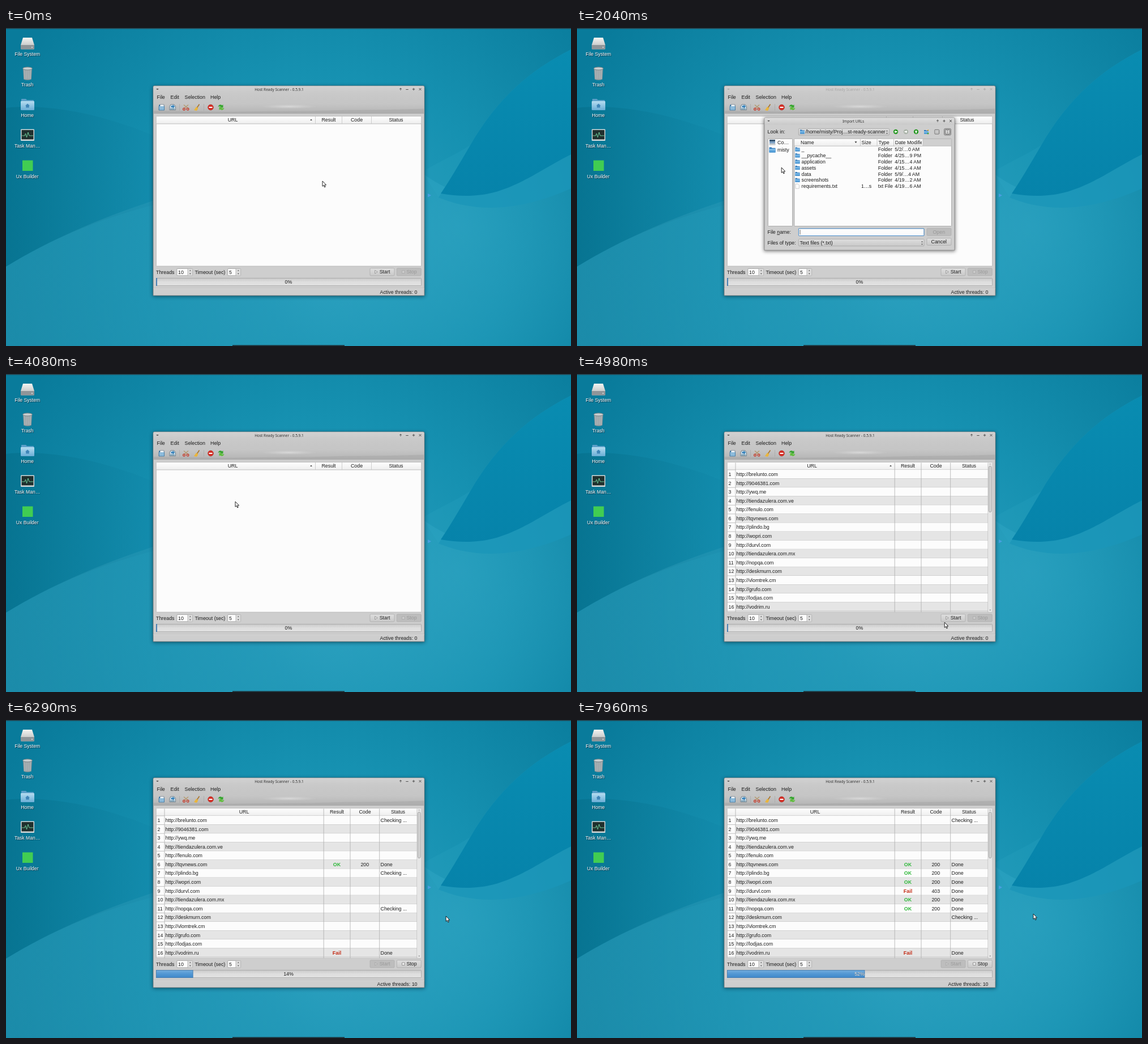
Recreate the animation shown at these times as an HTML page. Size 998 px wide and 561 px high, loop 8000 ms.

```html
<!DOCTYPE html>
<html lang="en">
<head>
<meta charset="utf-8">
<title>Desktop demo</title>
<style>
  html, body { margin: 0; width: 100%; height: 100%; overflow: hidden; background: #1590b1; }
  svg { display: block; width: 998px; height: 561px; }
  text { font: 8.87px "Liberation Sans", Arial, sans-serif; fill: #1c1c1c; white-space: pre; }
  .desk { font-size: 8.6px; fill: #fff; }
  .shade { font-size: 8.6px; fill: #012; opacity: .75; }
  .title text { font: 500 6.5px "Noto Sans", "Open Sans", sans-serif; fill: #333; }
  .title path { fill: none; stroke: #444; stroke-width: .9; }
  .title.dim text { fill: #a6a6a6; }
  .title.dim path { stroke: #a9a9a9; }
  .btn rect { fill: url(#face); stroke: #a6a6a6; stroke-width: .7; }
  .btn.off rect { fill: #bdbdbd; stroke: #adadad; }
  .btn.hot rect { fill: #e4e4e4; }
  .btn.down rect { fill: #b2b2b2; stroke: #888; }
  .btn.off text { fill: #999; }
  .btn path { fill: #eee; stroke: #777; stroke-width: .7; }
  .btn.off path { stroke: #a4a4a4; fill: #ccc; }
  .file > .back { fill: none; }
  .file.sel > .back { fill: #4a90d0; }
  .file.sel text { fill: #fff; }
  .ok { fill: #2fb83a; font-weight: bold; }
  .fail { fill: #c32a14; font-weight: bold; }
</style>
</head>
<body>
<svg id="stage" viewBox="0 0 998 561" xmlns="http://www.w3.org/2000/svg"></svg>
<script>
const LOOP = 8000;
const stage = document.getElementById('stage');
const $ = id => document.getElementById(id);
const range = n => Array.from({ length: n }, (_, i) => i);

// Markup helpers; text y is the middle of the capitals.
const text = (x, y, s, more = '') => `<text x="${x}" y="${y + 3.1}" ${more}>${s}</text>`;
const mid = (x, y, s, more = '') => text(x, y, s, `text-anchor="middle" ${more}`);
const rect = (x, y, w, h, fill, more = '') =>
  `<rect x="${x}" y="${y}" width="${w}" height="${h}" fill="${fill}" ${more}/>`;
const path = (d, fill = 'none', more = '') => `<path d="${d}" fill="${fill}" ${more}/>`;
const line = (d, stroke, width = .8) => path(d, 'none', `stroke="${stroke}" stroke-width="${width}"`);
const circle = (x, y, r, fill, more = '') => `<circle cx="${x}" cy="${y}" r="${r}" fill="${fill}" ${more}/>`;
const group = (id, body, more = '') => `<g id="${id}" ${more}>${body}</g>`;
const at = (x, y, body) => `<g transform="translate(${x} ${y})">${body}</g>`;
const box = (x, y, w, h, fill = '#fcfcfc', edge = '#9c9c9c', r = 1) =>
  rect(x + .4, y + .4, w - .8, h - .8, fill, `stroke="${edge}" stroke-width=".8" rx="${r}"`);
const fade = (id, stops, dir = 'x2="0" y2="1"') => `<linearGradient id="${id}" ${dir}>` +
  stops.map(([o, c, a = 1]) => `<stop offset="${o}" stop-color="${c}" stop-opacity="${a}"/>`).join('') + '</linearGradient>';
const up = (x, y, s = 1.8, fill = '#333') => path(`M${x - s} ${y + s * .6}h${2 * s}l${-s} ${-s * 1.3}z`, fill);
const down = (x, y, s = 1.8, fill = '#333') => path(`M${x - s} ${y - s * .6}h${2 * s}l${-s} ${s * 1.3}z`, fill);
const button = (id, x, y, w, h, label, labelX, icon = '') =>
  group(id, rect(x, y, w, h, 'none', 'rx="1.5"') + icon + mid(labelX, y + h / 2, label), 'class="btn"');

const defs = `<defs>
  <radialGradient id="sky" gradientUnits="userSpaceOnUse" cx="560" cy="400" r="640">
    <stop offset="0" stop-color="#2aa0bf"/><stop offset=".5" stop-color="#1691b1"/>
    <stop offset="1" stop-color="#097b9b"/></radialGradient>
  <radialGradient id="shine" gradientUnits="userSpaceOnUse" cx="800" cy="350" r="350">
    <stop offset="0" stop-color="#36a9c6" stop-opacity=".5"/><stop offset="1" stop-color="#36a9c6" stop-opacity="0"/></radialGradient>` +
  fade('left', [[0, '#06728f'], [1, '#138cad']], 'x2="1" y2="0"') +
  fade('hill', [[0, '#2b97b3', .5], [.5, '#2b9ab8', .4], [1, '#2b9ab8', 0]], 'x2="1" y2="0"') +
  fade('fin', [[0, '#098cb1'], [1, '#0683aa']]) +
  fade('bar', [[0, '#d2d2d2'], [.25, '#c9c9c9'], [.65, '#c5c5c5'], [1, '#b4b4b4']]) +
  fade('face', [[0, '#dedede'], [1, '#c9c9c9']]) +
  fade('head', [[0, '#fdfdfd'], [1, '#eeeeee']]) +
  fade('fill', [[0, '#72acdd'], [.5, '#5297d3'], [1, '#4088c9']]) +
  fade('trough', [[0, '#c9c9c9'], [.5, '#dedede'], [1, '#e2e2e2']]) +
  fade('folder', [[0, '#8ec6ee'], [1, '#3d8fd0']]) +
  fade('home', [[0, '#b5dcf0'], [1, '#6aaed6']]) +
  fade('steel', [[0, '#f4f4f2'], [1, '#b4b7b8']]) +
  `<radialGradient id="glow"><stop offset="0" stop-color="#d9d9d9"/>
    <stop offset="1" stop-color="#d0d0d0" stop-opacity="0"/></radialGradient>
  <filter id="blur" x="-10%" y="-10%" width="120%" height="120%"><feGaussianBlur stdDeviation="3"/></filter>
  <clipPath id="done"><rect id="doneBox" x="265" y="440" height="16"/></clipPath>
  <clipPath id="dateClip"><rect x="559" y="195" width="50" height="155"/></clipPath></defs>`;

function wallpaper() {
  return rect(0, 0, 998, 561, 'url(#sky)') +
    path('M0 141C70 133 170 150 270 194V310C170 334 80 372 0 421z', 'url(#left)', 'opacity=".85"') +
    path('M0 421C80 372 170 334 262 304C400 264 520 270 660 330V561H0z', 'url(#hill)') +
    path('M400 180C560 150 680 215 735 256C775 285 810 297 842 294C900 286 950 246 998 223V561H400z', 'url(#shine)') +
    path('M735 254C790 220 850 205 870 146L764 299C755 285 745 270 735 254z', '#2da3c1', 'opacity=".2"') +
    path('M998 38C925 75 868 124 820 207C800 241 783 271 764 299C820 322 895 329 998 283z', '#1b96b9', 'opacity=".8"') +
    path('M998 38C925 75 868 124 820 207C803 236 788 262 768 292C795 297 820 297 842 294C900 286 950 246 998 223z', 'url(#fin)') +
    path('M745 292l6 3.3l-6 3.3z', '#4a9fe0') +
    rect(0, 0, 998, 1.5, '#27404a') + rect(400, 559.4, 198, 1.6, '#1d3038');
}

function desktopIcons() {
  const label = (y, s) => mid(38.4, y + .8, s, 'class="shade"') + mid(37.7, y, s, 'class="desk"');
  return path('M30 17h16l4 13v6a1.5 1.5 0 0 1-1.5 1.5h-21a1.5 1.5 0 0 1-1.5-1.5v-6z', 'url(#steel)') +
    path('M26 30h24v6a1.5 1.5 0 0 1-1.5 1.5h-21a1.5 1.5 0 0 1-1.5-1.5z', '#8f9599') + circle(46, 34, 1, '#dfe6e8') +
    path('M30 71.5h16l-1.2 19q-6.800 3-13.600 0z', '#8f999d') +
    range(5).map(i => line(`M${32.6 + i * 2.7} 74l${.5 - i * .25} 16`, '#c4c9cb', 1)).join('') +
    `<ellipse cx="38" cy="71.5" rx="8.3" ry="2.5" fill="#c9ced0" stroke="#7d8587"/>` +
    path('M27 126q0-1 1-1h7l2 2h11q1 0 1 1v5H27z', '#5b9fc8') +
    rect(26, 129, 24, 16, 'url(#home)', 'rx="1.2"') + path('M34 137l4-3.6l4 3.6h-1.2v3.5h-5.600v-3.5z', '#3f86b8') +
    rect(26, 178.5, 24, 20.5, '#d4d9da', 'rx="1"') + rect(27.5, 180, 21, 16.5, '#20302e') +
    line('M28 190h5l1.5-4l2 7l2.5-9l2 6h7', '#74dca6', .9) +
    rect(29, 233.5, 18.5, 18.5, '#41cd52') +
    ['File System', 'Trash', 'Home', 'Task Man…', 'Ux Builder'].map((s, i) => label(46 + 54 * i, s)).join('');
}

const docIcon = (x, y) => at(x, y, path('M-5-3.5l1-1.5h3l1 1.5h4.5v8h-9.5z', '#3478ae') +
  rect(-3, -5, 7, 6, '#eef4f8', 'stroke="#456" stroke-width=".5"') + path('M-5-2h10l-.5 7h-9z', '#8dbbdb') +
  line('M-5-2v7h9.500v-7', '#2d6796', .7));

function toolbar() {
  return group('hover', rect(267, 132, 17, 16.5, '#a7a7a7', 'stroke="#707070" rx="1.5"')) + docIcon(275, 140) +
    at(294, 140, path('M-5-1.5l2-3.5h6l2.5 3.5v6h-10.5z', '#d9e5ec', 'stroke="#465b69" stroke-width=".7"') +
      path('M-4 1h8v3h-8z', '#8fb0c4') + path('M-2.5-3h3v-2l4 3.5l-4 3.5v-2h-3z', '#3d86bd')) +
    line('M306.5 134v12M349.5 134v12', '#aaa') +
    at(318, 140, line('M-4-4.5l8 7M4-4.5l-8 7', '#b59b72', 1.5) +
      circle(-3.5, 3, 1.9, 'none', 'stroke="#c7392b" stroke-width="1.3"') +
      circle(3, 3, 1.9, 'none', 'stroke="#c7392b" stroke-width="1.3"')) +
    at(337.5, 140, line('M4-5.5l-4 6', '#a9752e', 1.6) + path('M-1.5-1l3.5 2.5l-2.5 4.5l-5-1z', '#eab53c')) +
    circle(361.5, 140, 4.9, '#d42f26', 'stroke="#a82019" stroke-width=".5"') + rect(358.5, 139, 6, 2, '#fff') +
    at(380, 140, path('M-5.5-1q2-6 7.500-2.500l1.500-1.500v5.500h-5.500l1.500-1.500q-2.500-1.500-5 0z', '#35a52f') +
      path('M5.500 1q-2 6-7.500 2.500l-1.500 1.500v-5.500h5.500l-1.500 1.500q2.500 1.500 5 0z', '#5fbe3c'));
}

const windowMarks = (x, y, step, marks) => marks.map((d, i) => at(x + i * step, y, path(d))).join('');
const ARROW = 'M-1.8-.2l1.8-1.8l1.8 1.8M0-2v4';
const CROSS = 'M-2-2l4 4M2-2l-4 4';
const PLUS = 'M-2.2 0h4.4M0-2.2v4.4';

const heads = (y, list) => list.map(([x, s]) => mid(x, y, s)).join('');
const ROW = 15.58, TOP = 169;
const sites = ['brelunto.com', '9046381.com', 'ywq.me', 'tiendazulera.com.ve', 'fenulo.com', 'tqvnews.com',
  'plindo.bg', 'wopri.com', 'durvl.com', 'tiendazulera.com.mx', 'nopqa.com', 'deskmurn.com', 'vlomtrek.cm',
  'grufo.com', 'lodjas.com', 'vodrim.ru'];

function table() {
  const empty = heads(162, [[400.5, 'URL'], [570, 'Result'], [619.5, 'Code'], [689, 'Status']]) +
    up(539, 162) + line('M546.5 156v13M593.5 156v13M645.5 156v13', '#c4c4c4');
  const rows = sites.map((s, i) => {
    const y = TOP + ROW * i, c = y + 7.9;
    return rect(280, y, 446, ROW, i % 2 ? '#e5e5e5' : '#fcfcfc') + line(`M265.5 ${y + ROW}H726`, '#b2b2b2') +
      text(267.5, c, i + 1) + text(281.5, c, 'http://' + s) +
      mid(584.5, c, '', `id="res${i + 1}"`) + mid(633.8, c, '', `id="code${i + 1}"`) +
      text(661.5, c, '', `id="stat${i + 1}"`);
  }).join('');
  const full = heads(162, [[584.5, 'Result'], [634, 'Code'], [692.5, 'Status']]) + mid(0, 162, 'URL', 'id="urlHead"') +
    group('sort', up(554, 162)) + rows +
    line('M280 156.5V420M561.2 156.5V420M608 156.5V420M659.7 156.5V420M726 156.5V420', '#adadad') +
    rect(726.4, 156.3, 7, 263.3, '#e6e6e6') + box(727, 162, 5.5, 82, '#d3d3d3', '#999', 2.5) +
    up(729.8, 158.8, 1.3, '#999') + down(729.8, 416.5, 1.3, '#777');
  return box(265, 155.5, 469, 265, '#fcfcfc', '#b4b4b4') + rect(265.8, 156.3, 467.4, 12.7, 'url(#head)') +
    line('M265.5 169h468', '#adadad') + group('empty', empty) + group('full', full);
}

const spin = (x, w, s) => box(x, 424, w, 13.2) + text(x + 2.6, 430.5, s) +
  rect(x + w - 9, 424.8, 8.2, 11.6, '#dcdcdc') + line(`M${x + w - 9} 424.5v12.5`, '#aaa') +
  up(x + w - 4.7, 427.8, 1.3) + down(x + w - 4.7, 433.6, 1.3);

function mainWindow() {
  return rect(259, 103, 481, 371, '#002b3a', 'filter="url(#blur)" opacity=".6" rx="3"') +
    path('M260 472V104q0-2 2-2h475q2 0 2 2v368z', '#cecece', 'stroke="#777" stroke-width=".8"') +
    path('M260.4 151V104q0-1.6 2-1.6h474q2 0 2 1.6v47z', 'url(#bar)') +
    path('M260.5 146l60 .8l70 1l70-1l80-.5l60-1.5l80-.8l58-1.5v7.5h-478z', '#a9a9a9', 'opacity=".6"') +
    `<ellipse cx="500" cy="138.5" rx="50" ry="4" fill="url(#glow)"/>` +
    line('M260.5 150.6h478', '#a4a4a4') +
    group('mainTitle', mid(482.5, 107.7, 'Host Ready Scanner - 0.5.9.1') +
      at(267.5, 108, path('M-1.5-.5h3l-1.5 1.5z')) + windowMarks(697, 108, 11.5, [ARROW, 'M-2.2 .5h4.4', PLUS, CROSS])) +
    text(266.5, 122, 'File') + text(290.5, 122, 'Edit') + text(315.5, 122, 'Selection') + text(361, 122, 'Help') +
    toolbar() + table() +
    text(265, 430.5, 'Threads') + spin(301.5, 28.5, '10') + text(333.5, 430.5, 'Timeout (sec)') + spin(391.3, 23.7, '5') +
    button('start', 643, 423.7, 43, 13.3, 'Start', 669, path('M651.7 427.6l4.5 2.7l-4.5 2.7z')) +
    button('stop', 690.3, 423.7, 43, 13.3, 'Stop', 716.5, path('M699.5 428h4.6v4.6h-4.6z')) +
    box(265, 441, 469, 14, 'url(#trough)', '#a2a2a2') +
    `<rect id="fillBar" x="265.4" y="441.4" height="13.2" fill="url(#fill)" stroke="#3c77ad" stroke-width=".8"/>` +
    mid(499, 447.7, '', 'id="pct"') + `<g clip-path="url(#done)">` + mid(499, 447.7, '', 'id="pctLit" style="fill:#fff"') + '</g>' +
    line('M260.5 459h478', '#b5b5b5') + line('M260.5 459.9h478', '#dcdcdc') +
    text(726.5, 465.7, '', 'id="threads" text-anchor="end"');
}

const folder = (x, y) => path(`M${x} ${y - 3.5}h3l1 1h4v6h-8z`, '#2d76b8') + rect(x, y - 1.5, 8, 5, 'url(#folder)');
const sheet = (x, y) => path(`M${x + .6} ${y - 4}h4.2l2 2v6h-6.2z`, '#fff', 'stroke="#aaa" stroke-width=".6"');
const disc = (x, fill, turn) => circle(x, 183, 4.2, fill) +
  `<path transform="translate(${x} 183) rotate(${turn})" d="M-2.5 0l2.5-2.4v1.5h2.4v1.8h-2.4v1.5z" fill="#fff"/>`;

const fileRow = ([name, size, type, date], i) => {
  const y = 214 + 10.85 * i;
  return `<g class="file" id="${name}">` + rect(384, y - 5.4, 227, 10.8, 'none', 'class="back"') +
    (type === 'Folder' ? folder(385.5, y) : sheet(385.5, y)) + text(396.5, y, name) +
    (size.includes('K') ? text(528, y, size, 'text-anchor="end"') : text(502, y, size)) +
    text(531.8, y, type) + text(561.3, y, date) + '</g>';
};

function dialog() {
  const home = [['_', '5/2/…0 AM'], ['__pycache__', '4/25…9 PM'], ['application', '4/15…4 AM'], ['assets', '4/15…4 AM'],
    ['data', '5/9/…4 AM'], ['screenshots', '4/19…2 AM']].map(([n, d]) => [n, '', 'Folder', d]);
  home.push(['requirements.txt', '1…s', 'txt File', '4/19…6 AM']);
  const data = [['sites.txt', '12 KB', '4/19…5 AM'], ['sites2.txt', '9…s', '4/24…8 AM'], ['sites3.txt', '2…s', '4/25…3 AM'],
    ['test.txt', '9…s', '5/9/…1 AM']].map(([n, s, d]) => [n, s, 'txt File', d]);
  return rect(330, 159, 338, 235, '#000', 'filter="url(#blur)" opacity=".5"') +
    path('M331 392V160q0-2 2-2h332q2 0 2 2v232z', '#cecece', 'stroke="#808080" stroke-width=".8"') +
    rect(331.5, 158.5, 335, 12, 'url(#face)') +
    `<g class="title">` + mid(488, 163.7, 'Import URLs') + at(338.5, 164, path('M-1.5-.5h3l-1.5 1.5z')) +
    windowMarks(637, 164, 11.5, [ARROW, PLUS, CROSS]) + '</g>' +
    text(336.5, 183, 'Look in:') + box(391, 177, 161, 12.5, 'url(#face)', '#a6a6a6') + folder(394, 183) +
    text(403.5, 183, '', 'id="dir"') + up(547.5, 181.5, 1.3) + down(547.5, 186, 1.3) +
    disc(563, '#2c9a28', 0) + disc(581, '#a9b3a8', 180) + disc(599, '#2c9a28', 90) +
    folder(613, 183.5) + path('M618 180.5l3-1.5v3z', '#e0a12c') + circle(620, 186, 1.5, '#49a83a') +
    box(631.5, 179, 8.5, 8.5, '#f4f4f4', '#444') +
    line('M633.5 181.8h1.8M636.5 181.8h1.8M633.5 184.8h1.8M636.5 184.8h1.8', '#444', 1.3) +
    box(648, 177, 13, 12.5, '#aeaeae', '#777', 2) + box(650.3, 179, 8.5, 8.5, '#f4f4f4', '#444') +
    line('M652.5 181.8h4M652.5 184.8h4', '#444', 1) +
    box(337, 195, 44, 155) + rect(340, 197, 10, 6.5, '#35536f') + rect(340, 200, 10, 3.5, '#7ea2c5') +
    rect(339.5, 204.5, 11, 2, '#b9bfc4') + text(354, 201.5, 'Co…') +
    path('M339.5 210.5h4l1 1.2h6v7.8h-11z', '#2d76b8') + rect(339.5, 213, 11, 6.5, 'url(#folder)') + text(354, 215, 'misty') +
    box(383.5, 195, 278.5, 155) + rect(384.3, 195.8, 277, 12.3, '#d0d0d0') + rect(384.3, 195.8, 226.7, 12.3, 'url(#head)') +
    line('M384 208.2h277.5', '#b2b2b2') + line('M500.5 196v12M530 196v12M559.5 196v12M611 196v12', '#bbb') +
    text(395, 201.5, 'Name') + down(492.5, 201.5, 2) + text(502.5, 201.5, 'Size') + text(532.5, 201.5, 'Type') +
    `<g clip-path="url(#dateClip)">` + text(561.8, 201.5, 'Date Modified') + '</g>' +
    group('homeDir', home.map(fileRow).join('')) + group('dataDir', data.map(fileRow).join('')) +
    text(336.5, 360, 'File <tspan text-decoration="underline">n</tspan>ame:') +
    box(391, 353.3, 222.5, 13.7) +
    `<rect id="focus" x="391.5" y="353.8" width="221.5" height="12.7" rx="1" fill="none" stroke="#4a8fce"/>` +
    group('caret', line('M394 356v8.5', '#222', .7)) + text(393.5, 360, '', 'id="fileName"') +
    button('open', 618, 353.3, 43, 13, 'Open', 639.3) +
    text(336.5, 378.5, 'Files of type:') + box(391, 372, 222.5, 13, 'url(#face)', '#a6a6a6') + text(393.5, 378.5, 'Text files (*.txt)') +
    up(609.5, 377, 1.3) + down(609.5, 381.5, 1.3) +
    button('cancel', 618, 370.8, 43, 12.5, 'Cancel', 639.3);
}

const pointer = path('M0 0v9.3l2.2-1.9l1.5 3.5l1.5-.7l-1.5-3.3h2.9z', '#fff',
  'stroke="#111" stroke-width=".9" stroke-linejoin="round"');

stage.innerHTML = defs + wallpaper() + desktopIcons() + mainWindow() + group('dialog', dialog()) + group('cursor', pointer);

// time, x, y
const trail = [[0, 559, 270], [590, 559, 270], [700, 530, 260], [850, 440, 215], [1000, 340, 165], [1120, 275, 140],
  [1200, 254, 134], [1270, 258, 135], [1350, 270, 135], [1780, 270, 135], [1900, 310, 185], [2040, 361, 246],
  [2200, 392, 261], [2460, 403, 255], [2900, 403, 255], [3420, 404, 225], [3620, 405, 225], [4400, 405, 225],
  [4500, 430, 252], [4700, 540, 350], [4860, 620, 420], [4980, 649, 438], [5070, 669, 440], [5190, 662, 431],
  [5400, 662, 431], [5650, 690, 400], [5850, 735, 365], [6030, 766, 350], [6290, 777, 346], [6500, 806, 342], [LOOP, 806, 342]];

// Each finished check adds two percent.
const ticks = [5700, 5850, 5950, 6030, 6090, 6190, 6250, 6400, 6480, 6560, 6640, 6720, 6800, 6840, 6880,
  7030, 7090, 7150, 7210, 7270, 7310, 7340, 7610, 7640, 7670, 7830];

// time, row, result, code; no result means still checking
const log = [[5400, 1], [5400, 6], [5400, 11], [5400, 16], [6090, 6, 'OK', 200], [6090, 7], [6190, 16, 'Fail', ''],
  [6400, 7, 'OK', 200], [6400, 8], [6720, 8, 'OK', 200], [6720, 9], [7090, 9, 'Fail', 403], [7090, 10],
  [7270, 11, 'OK', 200], [7270, 12], [7830, 10, 'OK', 200]];

const show = (id, on) => $(id).setAttribute('visibility', on ? 'visible' : 'hidden');
const put = (id, s) => { const e = $(id); if (e.textContent !== String(s)) e.textContent = s; };
const cls = (id, s) => $(id).setAttribute('class', s);

function cursorAt(t) {
  const i = Math.max(1, trail.findIndex(p => p[0] >= t));
  const [t0, x0, y0] = trail[i - 1], [t1, x1, y1] = trail[i];
  const k = (t - t0) / (t1 - t0);
  return [x0 + (x1 - x0) * k, y0 + (y1 - y0) * k];
}

function drawResults(t) {
  const state = {};
  for (const [when, row, result = '', code = ''] of log) if (t >= when) state[row] = { result, code };
  sites.forEach((_, i) => {
    const n = i + 1, s = state[n];
    put('res' + n, s ? s.result : '');
    cls('res' + n, s ? s.result.toLowerCase() : '');
    put('code' + n, s ? s.code : '');
    put('stat' + n, s ? (s.result ? 'Done' : 'Checking ...') : '');
  });
}

function drawDialog(t) {
  const open = t >= 1750 && t < 3960, inside = t >= 2830;
  $('dialog').style.display = open ? '' : 'none';
  cls('mainTitle', t >= 1750 && t < 4020 ? 'title dim' : 'title');
  if (!open) return;
  $('homeDir').style.display = inside ? 'none' : '';
  $('dataDir').style.display = inside ? '' : 'none';
  const picked = t >= 3670 ? 'sites2.txt' : t >= 2670 && !inside ? 'data' : '';
  for (const id of ['data', 'sites2.txt']) cls(id, id === picked ? 'file sel' : 'file');
  put('fileName', picked);
  put('dir', inside ? '/home/misty/Pro…dy-scanner/data' : '/home/misty/Proj…st-ready-scanner');
  cls('open', picked ? 'btn' : 'btn off');
  show('focus', t < 2670);
  show('caret', t < 2670);
}

function draw(t) {
  $('cursor').setAttribute('transform', `translate(${cursorAt(t).join(' ')})`);
  show('hover', t >= 1310 && t < 1750);
  $('hover').firstChild.setAttribute('fill', t >= 1430 && t < 1490 ? '#959595' : '#a9a9a9');
  drawDialog(t);

  const loaded = t >= 4140, live = t >= 6090;
  $('empty').style.display = loaded ? 'none' : '';
  $('full').style.display = loaded ? '' : 'none';
  $('sort').style.display = live ? 'none' : '';
  $('urlHead').setAttribute('x', live ? 420.5 : 415);
  cls('start', t >= 5300 ? 'btn off' : t >= 5230 ? 'btn down' : t >= 5070 ? 'btn hot' : 'btn');
  cls('stop', t >= 5300 ? 'btn' : 'btn off');
  drawResults(t);

  const pct = 2 * ticks.filter(v => t >= v).length;
  const width = Math.max(2, 4.68 * pct);
  $('fillBar').setAttribute('width', width - .8);
  $('doneBox').setAttribute('width', width);
  put('pct', pct + '%');
  put('pctLit', pct + '%');
  put('threads', 'Active threads: ' + (live ? 10 : 0));
}

function tick() {
  draw(performance.now() % LOOP);
  requestAnimationFrame(tick);
}
tick();
</script>
</body>
</html>
```
